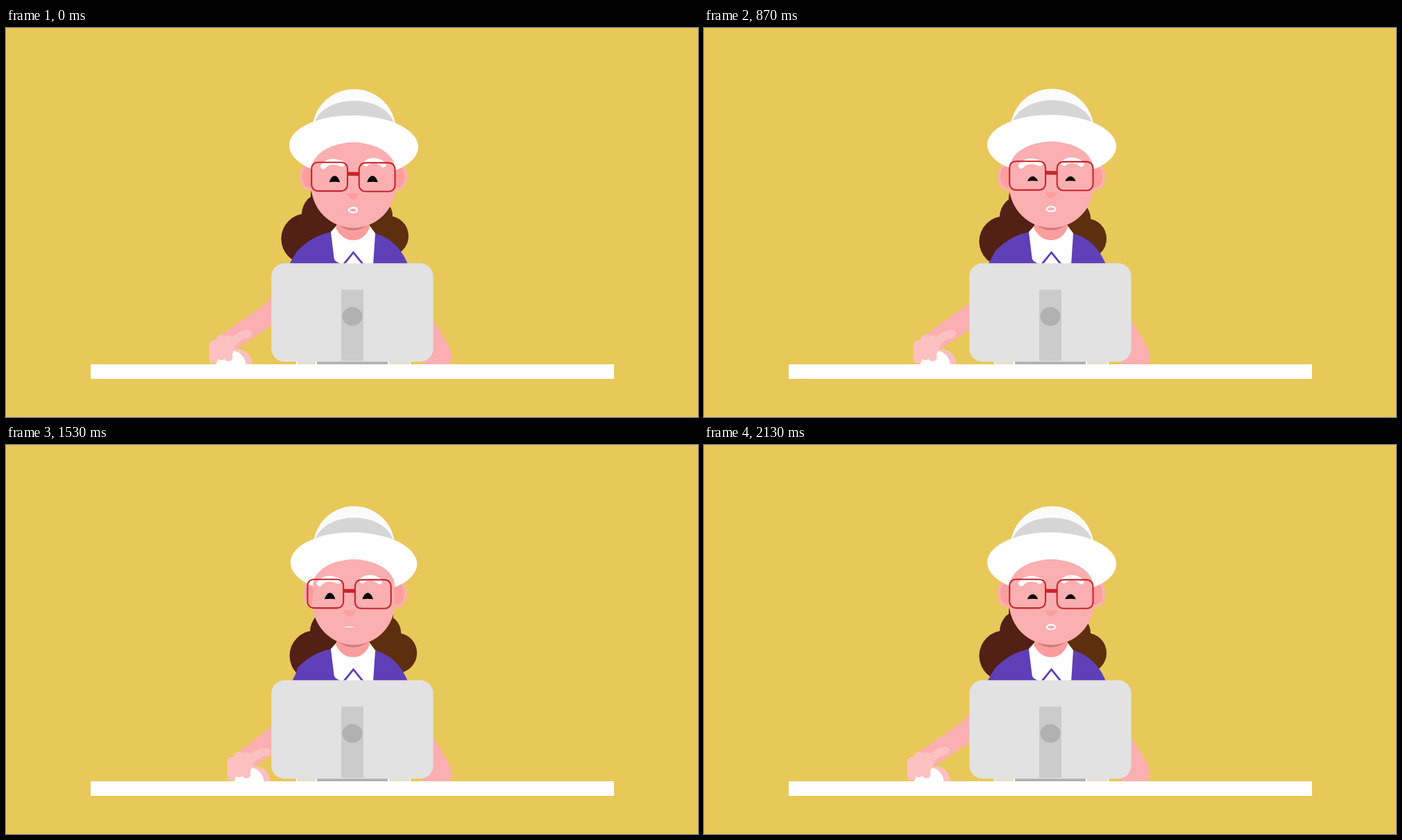
Animation of 997x561 px, one loop 2160 ms. Source, as an HTML page with a canvas:

```html
<!DOCTYPE html>
<html lang="en">
<head>
<meta charset="utf-8">
<title>At the desk</title>
<style>
html, body { margin: 0; width: 100%; height: 100%; overflow: hidden; background: #e8c859; }
canvas { display: block; }
</style>
</head>
<body>
<canvas id="stage" width="997" height="561"></canvas>
<script>
const ctx = document.getElementById('stage').getContext('2d');
const LOOP = 2160, STEP = 30, DESK = 485;
const SKIN = '#fbafb0', HAND = '#fcc0c1', BLUSH = '#fd9d9d', WHITE = '#fff';
const RED = '#c8242c', PURPLE = '#5f40b8', HAIR_L = '#522015', HAIR_R = '#5e2f0e';

function ease(t, from, to) {
  const p = Math.min(1, Math.max(0, (t - from) / (to - from)));
  return p * p * (3 - 2 * p);
}

// Rises from a to b, holds, falls from c to d
const pulse = (t, a, b, c, d) => ease(t, a, b) - ease(t, c, d);

function poseAt(t) {
  const lift = pulse(t, 30, 310, 315, 525);
  const echo = pulse(t, 670, 870, 870, 1095);
  const settle = pulse(t, 400, 540, 540, 670);
  return {
    hand: 26 * pulse(t % (LOOP / 2), 69, 402, 578, 1061),
    nod: lift + .12 * echo,
    sway: lift + .33 * echo - .13 * settle,
    turn: pulse(t, 1020, 1350, 1460, 2130),
    tap: pulse(t, 150, 310, 350, 510) - .3 * pulse(t, 1080, 1350, 1350, 1740),
    lips: 1 - pulse(t, 1080, 1200, 1880, 2040),
    lids: 9 - 2 * echo - 2 * pulse(t, 1800, 2130, 2130, LOOP)
  };
}

function ellipse(x, y, rx, ry, color, rot = 0) {
  ctx.fillStyle = color;
  ctx.beginPath();
  ctx.ellipse(x, y, rx, ry, rot, 0, Math.PI * 2);
  ctx.fill();
}

function circle(x, y, r, color) {
  ellipse(x, y, r, r, color);
}

function rect(x, y, w, h, color, r = 0) {
  ctx.fillStyle = color;
  ctx.beginPath();
  ctx.roundRect(x, y, w, h, r);
  ctx.fill();
}

function fill(d, color) {
  ctx.fillStyle = color;
  ctx.fill(new Path2D(d));
}

function stroke(d, color, width, cap = 'butt') {
  ctx.strokeStyle = color;
  ctx.lineWidth = width;
  ctx.lineCap = cap;
  ctx.stroke(new Path2D(d));
}

function at(x, y, draw) {
  ctx.save();
  ctx.translate(x, y);
  draw();
  ctx.restore();
}

function drawHair({ turn, sway }) {
  at(12.5 * turn, 11.5 * sway, () => {
    circle(524, 245, 22, HAIR_R);
    circle(530, 271, 27, HAIR_R);
    circle(551, 300, 29, HAIR_R);
    circle(462, 241, 23, HAIR_L);
    circle(458, 269, 32, HAIR_L);
    circle(433, 304, 36.5, HAIR_L);
  });
}

function drawBody({ hand }) {
  const edge = 408 + hand * .15;
  fill(`M${edge} 341 Q${edge + 7} 328 420 321 C435 306 451 297 470 294
    L530 296 C553 301 570 318 579 341 Z`, PURPLE);
  fill('M477 284 L468 294 L472.5 331 Q473 336 478 338 L483 341 H529 L532 296 L523 284 Z', WHITE);
  fill('M475 288 Q484 306 500 306 Q516 306 524 288 L520 270 H480 Z', BLUSH);
  fill('M479 284 Q489 291.7 500 291.7 Q511 291.7 522 284 Z', '#cb7e80');
  stroke('M486.5 341 L500.5 323.7 L514.5 341', PURPLE, 2.8);
}

function drawEar(x, y, toward) {
  ellipse(x, y, 13, 19.5, SKIN);
  ellipse(x + toward, y, 10, 15.5, BLUSH);
}

function drawHead({ turn, nod, lips, lids }) {
  const cx = 500.5 + .5 * turn;
  const squash = 1 - .02 * turn;

  drawEar(436 + 5 * turn, 214.5 - nod, 1);
  drawEar(565 - .5 * turn, 214.5 - nod, -1);

  // Hat
  ellipse(501.5, 147 - 4.5 * nod, 60 * squash, 58.8, '#fbfbfb');
  ellipse(501.5, 145 - 5 * nod, 58.5 * squash, 40.3, '#d6d6d6');
  ellipse(501, 170.5 - 9 * nod, 93 * squash, 44.5 - 3 * nod, WHITE, .016);

  // Face, with the brim opening above it
  ellipse(cx, 203 - 9 * nod, 60 - turn, 38, SKIN);
  ellipse(cx, 226.5 - 4.5 * nod, 61 - 1.5 * turn, 61.8 + 4.5 * nod, SKIN);

  // Brows
  at(-5.5 * turn, -6 * nod, () => {
    stroke('M457 199.5 C464 191.5 474 191.5 484 196', WHITE, 8, 'round');
    stroke('M518.5 195.5 C525 189.5 537 190.5 543.5 197', WHITE, 8, 'round');
  });

  at(-7 * turn, -12 * nod, () => {
    for (const x of [473.5, 528]) {
      at(x, 222.3, () => {
        fill(`M-7.7 0 C-4 ${-1.33 * lids} 4 ${-1.33 * lids} 7.7 0 Q0 -1 -7.7 0 Z`, '#000');
      });
    }
  });

  at(-5.5 * turn, -13 * nod, () => {
    fill('M491 238.5 H509.5 Q505 247.5 500.3 247.5 Q495 247.5 491 238.5 Z', BLUSH);
    ctx.strokeStyle = WHITE;
    ctx.lineWidth = 1.1 + lips;
    ctx.beginPath();
    ctx.ellipse(500, 262.6, 6.2, .2 + 3.3 * lips, 0, 0, Math.PI * 2);
    ctx.stroke();
  });

  // Glasses
  at(-6 * turn, -12.4 * nod, () => {
    ctx.strokeStyle = RED;
    ctx.lineWidth = 2.1;
    ctx.beginPath();
    ctx.roundRect(440.2, 193.7, 51.8, 41.4, 9);
    ctx.roundRect(508.7, 194.4, 51.8, 41.4, 9);
    ctx.stroke();
    stroke('M492 210.2 L508.5 210.6', RED, 5.5);
  });
}

function drawArms({ hand, tap }) {
  ctx.save();
  ctx.beginPath();
  ctx.rect(0, 0, 997, DESK);
  ctx.clip();

  fill('M608 408 L638 459 Q644 470 640 486 H600 Z', SKIN);
  fill(`M${310 + hand} 442 L390 ${387 + .5 * hand} V${424 + .69 * hand}
    L${330 + hand} 464 Z`, SKIN);
  at(hand, .5 * hand, () => fill('M371 400.5 Q377 396 383 384 H400 V410 Z', SKIN));

  at(hand, 0, () => {
    // Mouse under the palm
    ellipse(333, 484, 21.5, 21, HAND);
    ellipse(324, 486, 21.5, 21, WHITE);
    rect(293, 450.5, 12, 33.5, HAND, 5);
    rect(303.5, 442.5, 12, 36.5, HAND, 5);
    rect(314.5, 443, 11.8, 37.5, HAND, 5);
    fill('M298 451 L307 447 L327 449 L330 461 L324 474 H298 Z', HAND);
    stroke(`M321 462 Q${331 + tap} 443.5 ${348 - 7 * tap} ${441 - 12 * tap}`, HAND, 12, 'round');
  });
  ctx.restore();
}

function drawDesk() {
  rect(418, 478, 165, 8, WHITE);
  rect(419.4, 478, 162.2, 8, '#e3dfcc');
  rect(446, 478, 106, 8, WHITE);
  rect(448, 478, 102, 7, '#b1b1b1');
  rect(382.3, 339.3, 233.2, 142, '#e2e2e2', 19);
  rect(483, 377.5, 32, 102.5, '#cbcbcb');
  ellipse(499, 416, 14.5, 13.5, '#b1b1b1');
  rect(122, DESK, 754, 21, WHITE);
}

function frame(now) {
  const pose = poseAt(Math.floor((now % LOOP) / STEP) * STEP);
  rect(0, 0, 997, 561, '#e8c859');
  drawHair(pose);
  drawBody(pose);
  drawHead(pose);
  drawArms(pose);
  drawDesk();
}

let start;
function tick(now) {
  start ??= now;
  frame(now - start);
  requestAnimationFrame(tick);
}
frame(0);
requestAnimationFrame(tick);
</script>
</body>
</html>
```
